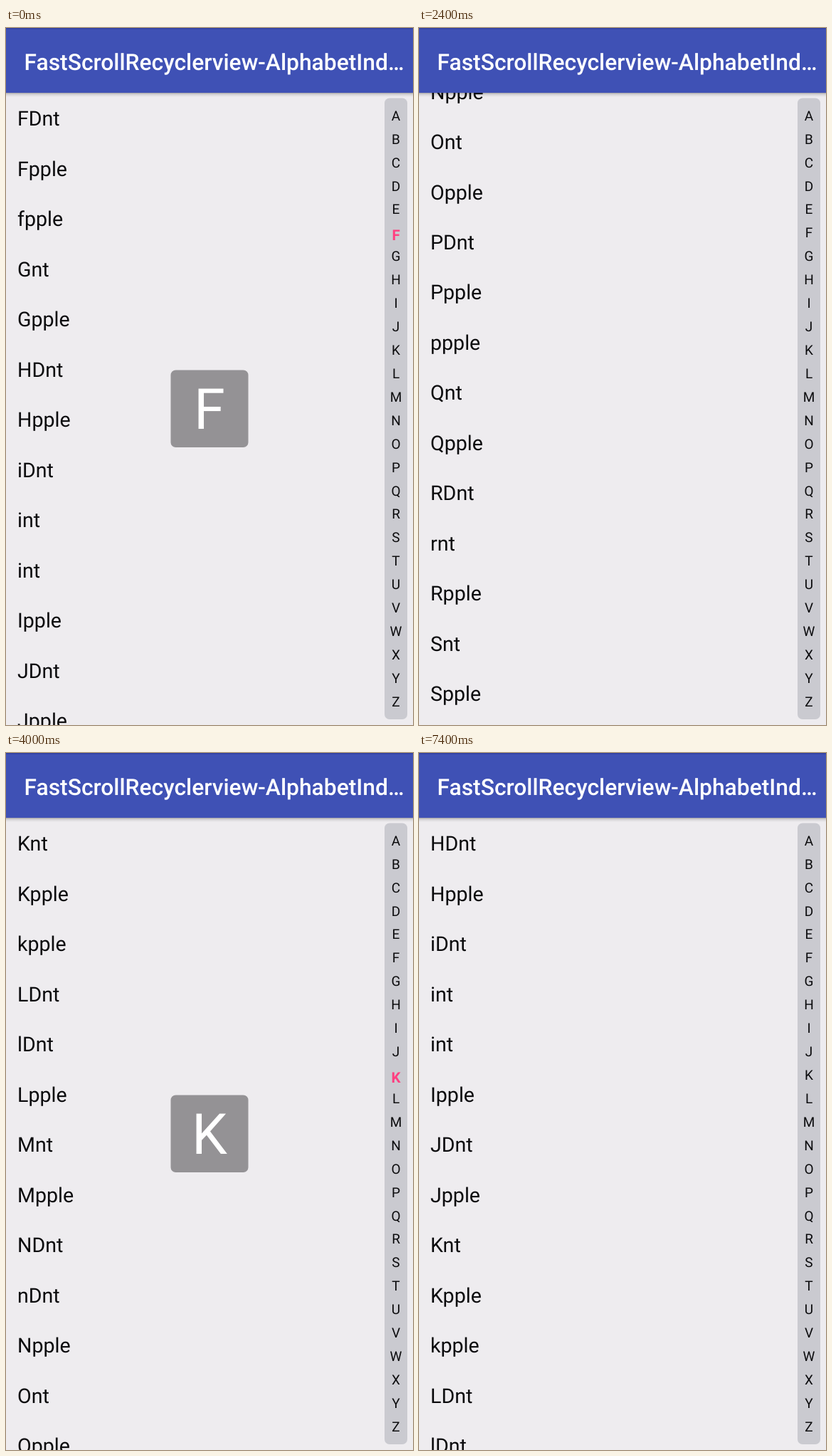
Animation of 572 by 979 pixels, one loop 8000 ms. Source, as an HTML page:

```html
<!DOCTYPE html>
<html lang="en">
<head>
<meta charset="utf-8">
<title>Alphabet index list</title>
<style>
  html, body { margin: 0; width: 100%; height: 100%; overflow: hidden; background: #eeecef; }
  svg { display: block; font-family: Roboto, sans-serif; text-rendering: geometricPrecision; }
  #list { font-size: 28.6px; fill: #0b0b0d; }
  #index { font-size: 19px; fill: #0b0b0d; text-anchor: middle; }
  #index .on { font-size: 20.5px; font-weight: 700; fill: #ff4081; }
  #popup { font-size: 79.4px; fill: #fff; text-anchor: middle; }
  #title { font-size: 31.8px; font-weight: 500; fill: #fff; }
</style>
</head>
<body>
<svg width="572" height="979" viewBox="0 0 572 979">
  <defs>
    <linearGradient id="shade" x2="0" y2="1">
      <stop stop-color="#000" stop-opacity=".3"/>
      <stop offset=".4" stop-color="#000" stop-opacity=".1"/>
      <stop offset="1" stop-color="#000" stop-opacity="0"/>
    </linearGradient>
  </defs>
  <rect width="572" height="979" fill="#eeecef"/>
  <g id="list"></g>
  <rect x="532" y="98.5" width="32" height="872.5" rx="7" fill="#cacad0"/>
  <g id="index"></g>
  <g id="popup">
    <rect x="231.5" y="480.5" width="109" height="108.5" rx="7" fill="#949295"/>
    <text x="286" y="563"></text>
  </g>
  <rect y="91" width="572" height="6" fill="url(#shade)"/>
  <rect width="572" height="91" fill="#3f51b5"/>
  <rect width="572" height="1.5" fill="#303f9f"/>
  <text id="title" x="25.5" y="58.5">FastScrollRecyclerview-AlphabetInd…</text>
</svg>
<script>
const LOOP = 8000, TICK = 100;
const ROW = 70.47, FIRST_ROW = 137.4, LAST_TOP = 38.39;
const LETTER = 32.92, FIRST_LETTER = 129.8;

const names = ('FDnt Fpple fpple Gnt Gpple HDnt Hpple iDnt int int Ipple JDnt Jpple Knt Kpple kpple ' +
  'LDnt lDnt Lpple Mnt Mpple NDnt nDnt Npple Ont Opple PDnt Ppple ppple Qnt Qpple RDnt rnt Rpple ' +
  'Snt Spple TDnt Tpple tpple Unt Upple VDnt Vpple Wnt Wpple XDnt Xpple Ynt Ypple ZDnt Zpple').split(' ');
const letters = [...'ABCDEFGHIJKLMNOPQRSTUVWXYZ'];

// Finger on the index: touched letters at given times, then the release.
const drags = [
  { keys: [[0, 'F'], [900, 'P']], release: 1400 },
  { keys: [[2000, 'M']], release: 2100 },
  { keys: [[3900, 'J'], [4000, 'K'], [4500, 'Z']], release: 4600 },
  { keys: [[5300, 'T'], [5800, 'O'], [6000, 'N']], release: 6100 },
  { keys: [[7200, 'H']], release: 7400 }
];
const fling = { start: 2200, end: 3700, rows: 11.53, rate: 2.5 };

const find = selector => document.querySelector(selector);
const list = find('#list'), popup = find('#popup'), popupText = find('#popup text');

function addText(parent, text, x, y) {
  const node = document.createElementNS('http://www.w3.org/2000/svg', 'text');
  node.setAttribute('x', x);
  node.setAttribute('y', y);
  node.textContent = text;
  parent.append(node);
  return node;
}

names.forEach((name, i) => addText(list, name, 16, FIRST_ROW + i * ROW));
const marks = letters.map((c, i) => addText(find('#index'), c, 548, FIRST_LETTER + i * LETTER));

function letterAt(keys, t) {
  const next = keys.findIndex(key => key[0] > t);
  if (next < 0) return letters.indexOf(keys.at(-1)[1]);
  const [t0, a] = keys[next - 1], [t1, b] = keys[next];
  const from = letters.indexOf(a), to = letters.indexOf(b);
  return Math.round(from + (to - from) * (t - t0) / (t1 - t0));
}

function topRow(letter, t) {
  let row = names.findIndex(name => name[0].toUpperCase() === letters[letter]);
  if (t > fling.start && t < drags[2].keys[0][0]) {
    const seconds = (Math.min(t, fling.end) - fling.start) / 1000;
    row += fling.rows * (1 - Math.exp(-fling.rate * seconds));
  }
  return Math.min(row, LAST_TOP);
}

function draw() {
  const t = Math.floor(performance.now() % LOOP / TICK) * TICK;
  const drag = drags.findLast(d => d.keys[0][0] <= t);
  const letter = letterAt(drag.keys, t);
  const touching = t < drag.release;

  list.setAttribute('transform', `translate(0 ${-topRow(letter, t) * ROW})`);
  popup.setAttribute('visibility', touching ? 'visible' : 'hidden');
  popupText.textContent = letters[letter];
  marks.forEach((mark, i) => {
    const on = touching && i === letter;
    mark.setAttribute('class', on ? 'on' : '');
    mark.setAttribute('y', FIRST_LETTER + i * LETTER + (on ? 4 : 0));
  });
  requestAnimationFrame(draw);
}
draw();
</script>
</body>
</html>
```
